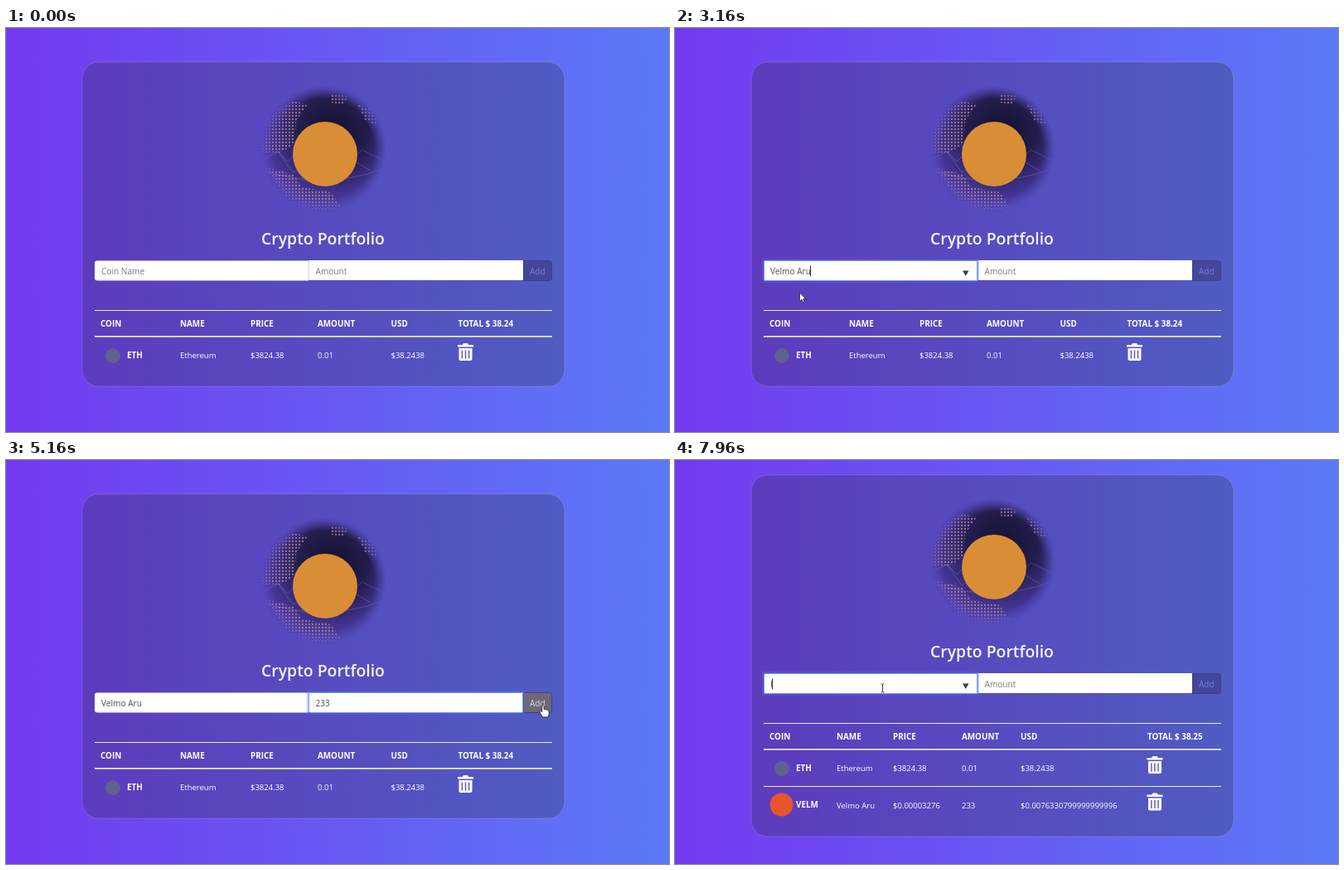
An HTML page for the animation above (8 s loop, 800x487 px).

```html
<!DOCTYPE html>
<html lang="en">
<head>
<meta charset="utf-8">
<title>Crypto Portfolio</title>
<style>
  html, body { margin: 0; width: 100%; height: 100%; overflow: hidden; background: #6759f4; }
  svg { display: block; width: 100vw; height: 100vh; }
  text { font: 9.5px "Open Sans", "Noto Sans", sans-serif; fill: #fff; white-space: pre; }
  .title { font-size: 19.4px; font-weight: 600; text-anchor: middle; fill: #f4f2ff; }
  .bold { font-size: 9.9px; font-weight: 700; }
  .field { font-size: 10.1px; fill: #495057; }
  .field.empty { fill: #757b82; }
  .rule { fill: #fff; opacity: .88; }
</style>
</head>
<body>
<svg viewBox="0 0 800 487" preserveAspectRatio="none">
  <defs>
    <linearGradient id="sky">
      <stop stop-color="#733aef"/><stop offset="1" stop-color="#5b7af8"/>
    </linearGradient>
    <radialGradient id="fade">
      <stop offset=".8" stop-color="#fff"/><stop offset="1" stop-color="#fff" stop-opacity="0"/>
    </radialGradient>
    <radialGradient id="night" cx=".58" cy=".36" r=".6">
      <stop stop-color="#15122f"/><stop offset=".45" stop-color="#221c4b"/>
      <stop offset="1" stop-color="#4a37a0" stop-opacity=".75"/>
    </radialGradient>
    <mask id="globeEdge"><circle cx="383" cy="146" r="76" fill="url(#fade)"/></mask>
    <pattern id="dots" width="4" height="4" patternUnits="userSpaceOnUse">
      <circle cx="2" cy="2" r="1.15" fill="#b58b96"/>
    </pattern>
  </defs>

  <rect width="800" height="487" fill="url(#sky)"/>

  <g id="page">
    <rect id="card" x="92" y="41" width="582" height="391" rx="20"
          fill="#2e2e46" fill-opacity=".3" stroke="#fff" stroke-opacity=".14"/>

    <g mask="url(#globeEdge)">
      <circle cx="383" cy="146" r="76" fill="url(#night)"/>
      <path fill="url(#dots)" opacity=".8" d="M346 88 364 92 350 112 348 140 332 150 308 150V118L326 98Z
        M312 168 346 176 358 192 392 198 404 216 380 224 346 214Z M392 80 412 82 408 92 392 90Z
        M424 92 442 98 450 118 434 112Z"/>
      <path fill="none" stroke="#cfc3ee" stroke-opacity=".32" stroke-width=".7"
        d="M310 158 328 149 340 161 356 145 372 160 398 146 416 158 430 147 456 160
        M312 172Q384 196 454 170 M328 149 346 174 372 160 392 180 416 158 440 172"/>
    </g>
    <circle cx="385" cy="152" r="39" fill="#d98e35"/>

    <text class="title" x="382.5" y="261">Crypto Portfolio</text>

    <path id="button" d="M624 280.5H655.5A3 3 0 0 1 658.5 283.5V301.5A3 3 0 0 1 655.5 304.5H624Z" stroke="#3c4088"/>
    <text id="buttonText" x="632" y="296.5" style="font-size:10px">Add</text>
    <path d="M365 280.5H110A3 3 0 0 0 107 283.5V301.5A3 3 0 0 0 110 304.5H365Z" fill="#fff"/>
    <path d="M365 280H624V304H365Z" fill="#fff"/>
    <path d="M365.5 280V304" stroke="#ced4da"/>
    <g id="focus" fill="none">
      <rect y="279.5" height="26" stroke="#5a63f0" stroke-opacity=".35" stroke-width="3"/>
      <rect y="280.5" height="24" rx="1" stroke="#6f9ef8"/>
    </g>
    <text id="coin" class="field" x="115" y="296.5"></text>
    <text id="amount" class="field" x="373.5" y="296.5"></text>
    <path id="arrow" d="M347 292.5H354.5L350.75 299Z" fill="#3a3d42"/>
    <rect id="caret" y="286.5" width="1" height="13" fill="#333"/>

    <rect class="rule" x="107" y="340" width="552" height="1"/>
    <rect class="rule" x="107" y="371" width="552" height="1.7"/>
    <g id="before"></g>
    <g id="after"></g>
  </g>

  <g id="pointer">
    <path id="default" d="M0 0V10.5L2.5 8.3 4.1 12 5.8 11.2 4.2 7.7H7.4Z" fill="#fff" stroke="#222" stroke-width=".8"/>
    <path id="beam" d="M-2-5H-.6L0-4.4 .6-5H2M0-4.4V4.4M-2 5H-.6L0 4.4 .6 5H2" fill="none" stroke="#333"/>
    <path id="hand" d="M-1.2 5.5V-1.5Q0-3.4 1.2-1.5V2.5Q2.6 1.6 3.4 3 5 2.3 5.5 3.7 7.2 3.4 7.2 5.2V8.5L5.8 12H-.2L-3.6 7Q-4.6 5-2.8 4.6Z"
          fill="#fff" stroke="#222" stroke-width=".9"/>
  </g>
</svg>

<script>
const LOOP = 8000, ADDED = 5400, LIFT = 23, ROW = 45;
const $ = id => document.getElementById(id);
const show = (id, on) => $(id).setAttribute('visibility', on ? 'visible' : 'hidden');
const set = (el, attrs) => { for (const k in attrs) el.setAttribute(k, attrs[k]); };

const label = (x, y, text, kind = '') => `<text class="${kind}" x="${x}" y="${y}">${text}</text>`;
const trash = (x, y) => `<path transform="translate(${x} ${y})" fill="#fff" fill-rule="evenodd"
  d="M0 2H5.5L7 0H12L13.5 2H19V4.5H0Z M1.5 6H17.5V19Q17.5 21 15.5 21H3.5Q1.5 21 1.5 19Z
  M4.7 8.5V18.5H6.1V8.5Z M8.8 8.5V18.5H10.2V8.5Z M12.9 8.5V18.5H14.3V8.5Z"/>`;

const coins = [
  { code: 'ETH', icon: '<circle cx="129" cy="395" r="9" fill="#62608f"/>',
    cells: ['Ethereum', '$3824.38', '0.01', '$38.2438'] },
  { code: 'VELM', icon: '<circle cx="128.5" cy="394" r="14" fill="#e6562a"/>',
    cells: ['Velmo Aru', '$0.00003276', '233', '$0.0076330799999999996'] }
];

function table(columns, total, rows) {
  const heads = ['NAME', 'PRICE', 'AMOUNT', 'USD', 'TOTAL $ ' + total];
  const body = rows.map((coin, i) => `<g transform="translate(0 ${i * (ROW - .5)})">
    ${i ? '<rect class="rule" x="107" y="371.5" width="552" height="1"/>' : ''}
    ${coin.icon}${label(146, 397.5, coin.code, 'bold')}
    ${coin.cells.map((c, j) => label(columns[j], 398, c)).join('')}
    ${trash(columns[4] - .5, 380)}</g>`);
  return label(114, 359.5, 'COIN', 'bold')
    + heads.map((h, i) => label(columns[i], 359.5, h, 'bold')).join('') + body.join('');
}
$('before').innerHTML = table([210, 295, 376, 464.5, 545.5], '38.24', coins.slice(0, 1));
$('after').innerHTML = table([195, 263, 346, 417, 570], '38.25', coins);

// Each list holds [start time, value]
const coinText = [[0, ''], [2100, 'v'], [2350, 've'], [3100, 'Velmo Aru'], [ADDED, ''], [7700, 'l']];
const amountText = [[0, ''], [4200, '2'], [4400, '23'], [4550, '233'], [ADDED, '']];
const focusOn = [[0, ''], [1760, 'coin'], [3650, 'amount'], [ADDED, ''], [6500, 'coin']];
const route = [
  [300, 830, 480], [1100, 219, 376], [1250, 219, 376], [1700, 161, 297], [2600, 161, 297],
  [2900, 150, 319], [3150, 150, 319], [3600, 397, 297.5], [4600, 397, 297.5],
  [5050, 648, 298], [5600, 648, 298], [6400, 250.5, 275], [LOOP, 250.5, 275]
];

const current = (steps, t) => steps.filter(s => s[0] <= t).pop();

function pointerAt(t) {
  const i = route.findIndex(k => k[0] > t);
  if (i < 1) return route[0].slice(1);
  const [a, b] = [route[i - 1], route[i]];
  const u = (t - a[0]) / (b[0] - a[0]), e = u * u * (3 - 2 * u);
  return [a[1] + (b[1] - a[1]) * e, a[2] + (b[2] - a[2]) * e];
}

function fill(id, value, hint) {
  $(id).textContent = value || hint;
  $(id).classList.toggle('empty', !value);
}

function draw(t) {
  const added = t >= ADDED, lift = added ? LIFT : 0;
  const [coinTime, coin] = current(coinText, t);
  const [amountTime, amount] = current(amountText, t);
  const [focusTime, focus] = current(focusOn, t);
  const [x, y] = pointerAt(t);

  set($('page'), { transform: `translate(0 ${-lift})` });
  set($('card'), { height: added ? 391 + ROW : 391 });
  show('before', !added);
  show('after', added);
  fill('coin', coin, 'Coin Name');
  fill('amount', amount, 'Amount');

  const inBar = y + lift > 280 && y + lift < 305;
  const overCoin = inBar && x > 107 && x < 365;
  const overButton = inBar && x >= 624 && x < 659;
  const overField = inBar && x > 107 && x < 624;
  const ready = coin && amount;
  set($('button'), { fill: ready && overButton ? '#6e6879' : '#43469a' });
  set($('buttonText'), { style: `font-size:10px;fill:${ready ? '#dcd9e4' : '#7480dc'}` });

  show('focus', focus);
  show('arrow', focus === 'coin' || overCoin);
  const left = focus === 'amount' ? 365 : 107, width = focus === 'amount' ? 259 : 258;
  const [glow, edge] = $('focus').children;
  set(glow, { x: left - .5, width: width + 1 });
  set(edge, { x: left + .5, width: width - 1 });

  const value = focus === 'amount' ? amount : coin;
  const touched = Math.max(focusTime, focus === 'amount' ? amountTime : coinTime);
  show('caret', focus && (t - touched) % 1000 < 500);
  if (focus) {
    const start = focus === 'amount' ? 373 : 114.5;
    set($('caret'), { x: Math.round(start + (value ? $(focus).getComputedTextLength() : 0)) });
  }

  set($('pointer'), { transform: `translate(${x} ${y})` });
  const hand = ready && overButton;
  show('beam', overField);
  show('hand', hand);
  show('default', !overField && !hand);
}

function tick(now) {
  draw(now % LOOP);
  requestAnimationFrame(tick);
}
draw(0);
requestAnimationFrame(tick);
</script>
</body>
</html>
```
